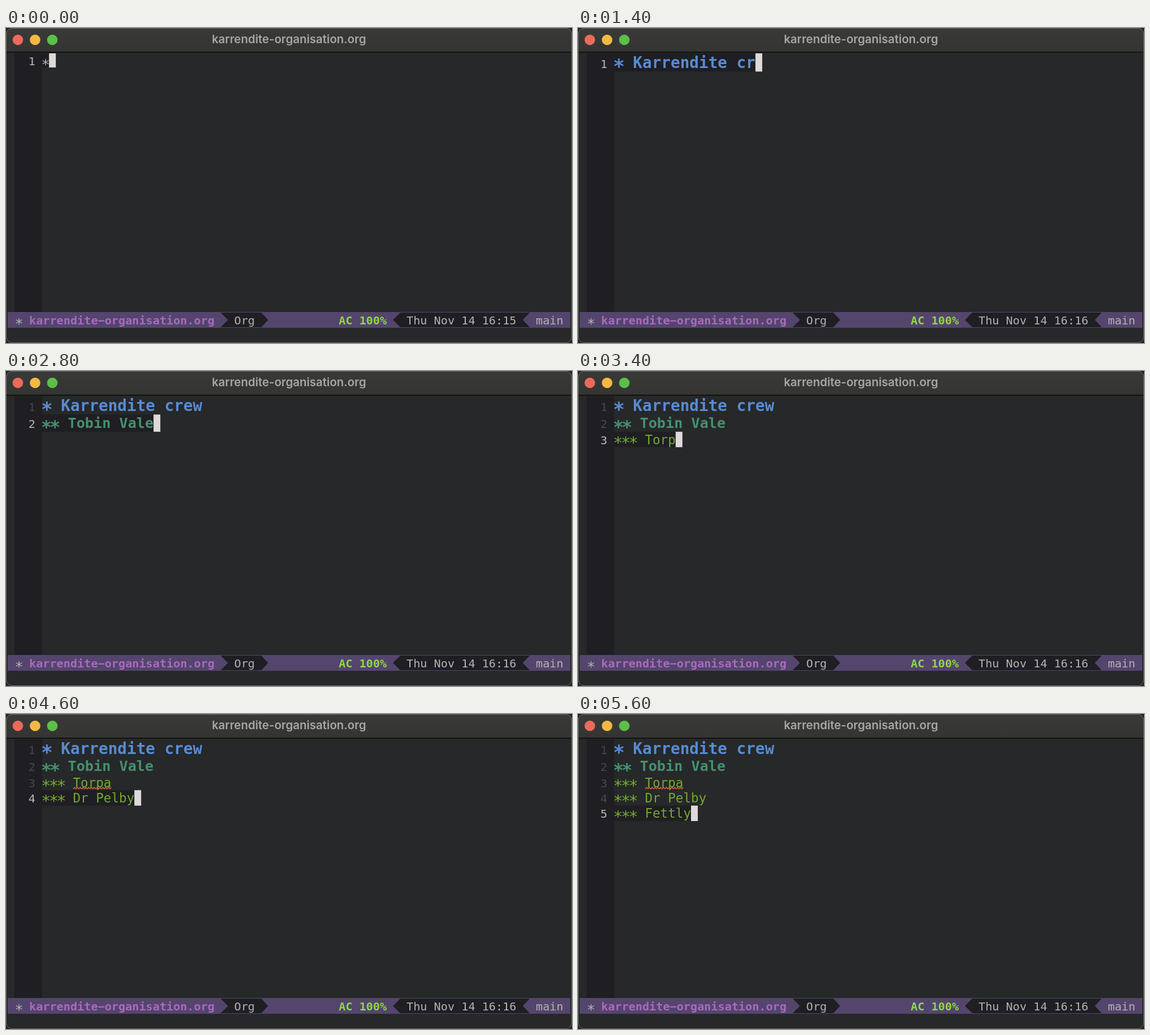
Animation of 1002 by 559 pixels, one loop 5700 ms. Source, as an HTML page:

```html
<!DOCTYPE html>
<html lang="en">
<head>
<meta charset="utf-8">
<title>Outline editor</title>
<style>
  html, body { margin: 0; width: 100%; height: 100%; overflow: hidden; background: #222324; }
  svg { display: block; width: 1002px; height: 559px; }
  text { white-space: pre; font-family: "DejaVu Sans Mono", monospace; font-size: 20.2px; fill: #b2b2b2; }
  .title { font: 600 20.45px Inter, sans-serif; fill: #a6a7a4; text-anchor: middle; }
  .file { font-weight: bold; fill: #aa69be; }
  .power { font-weight: bold; fill: #90d644; }
  .bar { fill: #54456d; }
  .dark { fill: #1f1e22; }
  .number { text-anchor: end; }
  .cursor { fill: #dedad9; }
  .squiggle { fill: none; stroke: #d2603a; stroke-width: 1.4; }
  /* Stars are drawn a quarter larger but keep the advance of their line. */
  .stars { font-size: 1.25em; letter-spacing: -0.1204em; }
</style>
</head>
<body>
<svg viewBox="0 0 1002 559">
  <defs>
    <linearGradient id="chrome" x2="0" y2="1">
      <stop offset="0" stop-color="#393a37"/>
      <stop offset="1" stop-color="#343532"/>
    </linearGradient>
    <clipPath id="frame"><rect width="1002" height="559" rx="11"/></clipPath>
  </defs>
  <g clip-path="url(#frame)">
    <rect width="1002" height="559" fill="#262829"/>
    <rect width="1002" height="42" fill="url(#chrome)"/>
    <rect y="42" width="1002" height="1.6" fill="#0c0d0d"/>
  </g>
  <circle cx="21" cy="21" r="9.3" fill="#ec6a5c"/>
  <circle cx="51.5" cy="21" r="9.3" fill="#f4b941"/>
  <circle cx="82" cy="21" r="9.3" fill="#5cbf49"/>
  <text class="title" x="501" y="27">karrendite-organisation.org</text>

  <rect class="dark" x="15" y="45" width="49" height="459"/>
  <g id="buffer"></g>

  <rect class="bar" x="3" y="504" width="996" height="28"/>
  <path class="dark" d="M380 505H452L464 518L452 531H380L393 518Z"/>
  <path class="dark" d="M698 505H927L915 518L927 531H698L685 518Z"/>
  <text x="15.5" y="532.5"><tspan class="stars">*</tspan></text>
  <text class="file" x="41" y="525.5">karrendite−organisation.org</text>
  <text x="404" y="525.5">Org</text>
  <text class="power" x="589" y="525.5">AC 100%</text>
  <text id="clock" x="709" y="525.5"></text>
  <text x="938" y="525.5">main</text>
  <rect x=".5" y=".5" width="1001" height="558" rx="10.5" fill="none" stroke="#686a69"/>
</svg>
<script>
  const TICK = 100, TICKS = 57, LEFT = 64, TOP = 45, ADVANCE = 0.602;

  // Row metrics by heading depth; depth 0 is plain text.
  const STYLES = [
    { size: 20.2, height: 25, base: 21, fill: "#b2b2b2", weight: 400 },
    { size: 27.7, height: 32.3, base: 26, fill: "#578bd2", weight: 700 },
    { size: 25.2, height: 30.5, base: 24, fill: "#45906f", weight: 700 },
    { size: 22.6, height: 27.4, base: 21.7, fill: "#72a833", weight: 400 }
  ];

  // Each line opens at one depth, is demoted at `demote`, then typed key by key.
  const LINES = [
    { text: "Karrendite crew", open: 0, demote: 1, depth: 1, type: 2 },
    { text: "Tobin Vale", open: 17, demote: 18, depth: 2, type: 19 },
    { text: "Torpa", open: 29, demote: 30, depth: 3, keys: [31, 32, 32, 34, 35], misspelt: 37 },
    { text: "Dr Pelby", open: 37, demote: 37, depth: 3, type: 39 },
    { text: "Fettly", open: 48, demote: 48, depth: 3, type: 50 }
  ];

  const buffer = document.getElementById("buffer");
  const clock = document.getElementById("clock");

  function typedCount(line, tick) {
    if (line.keys) return line.keys.filter(k => k <= tick).length;
    return Math.max(0, Math.min(line.text.length, tick - line.type + 1));
  }

  function squiggle(from, to, y) {
    let d = `M${from} ${y + 1.5}`;
    for (let x = from + 2.5, up = true; x <= to; x += 2.5, up = !up) d += `L${x} ${up ? y - 1.5 : y + 1.5}`;
    return `<path class="squiggle" d="${d}"/>`;
  }

  function drawLine(line, index, top, tick, current) {
    const depth = tick < line.demote ? line.depth - 1 : line.depth;
    const style = STYLES[depth];
    const step = style.size * ADVANCE;
    const stars = "*".repeat(Math.max(1, depth));
    const rest = depth ? " " + line.text.slice(0, typedCount(line, tick)) : "";
    const restX = LEFT + stars.length * step;
    const end = restX + rest.length * step;
    const baseline = top + style.base;
    let out = "";
    if (current) {
      out += `<rect class="dark" x="${LEFT}" y="${top}" width="${end - LEFT}" height="${style.height}"/>`
        + `<rect class="cursor" x="${end}" y="${top}" width="12" height="${style.height}"/>`;
    }
    out += `<text class="number" x="52" y="${baseline}" style="fill:${current ? "#b8b8b8" : "#45494f"}">${index + 1}</text>`
      + `<text style="font-size:${style.size}px;font-weight:${style.weight};fill:${style.fill}">`
      + `<tspan class="stars" x="${LEFT - step / 8}" y="${baseline + style.size * 0.33}">${stars}</tspan>`
      + `<tspan x="${restX}" y="${baseline}">${rest}</tspan></text>`;
    if (tick >= line.misspelt) out += squiggle(restX + step + 0.5, end, baseline + 2);
    return { out, height: style.height };
  }

  function draw(tick) {
    const open = LINES.filter(line => line.open <= tick);
    let top = TOP, html = "";
    open.forEach((line, i) => {
      const row = drawLine(line, i, top, tick, i === open.length - 1);
      html += row.out;
      top += row.height;
    });
    buffer.innerHTML = html;
    clock.textContent = "Thu Nov 14 16:" + (tick < 3 ? "15" : "16");
  }

  const start = performance.now();
  let shown = -1;
  function frame() {
    const tick = Math.floor((performance.now() - start) / TICK) % TICKS;
    if (tick !== shown) draw(shown = tick);
    requestAnimationFrame(frame);
  }
  frame();
</script>
</body>
</html>
```
